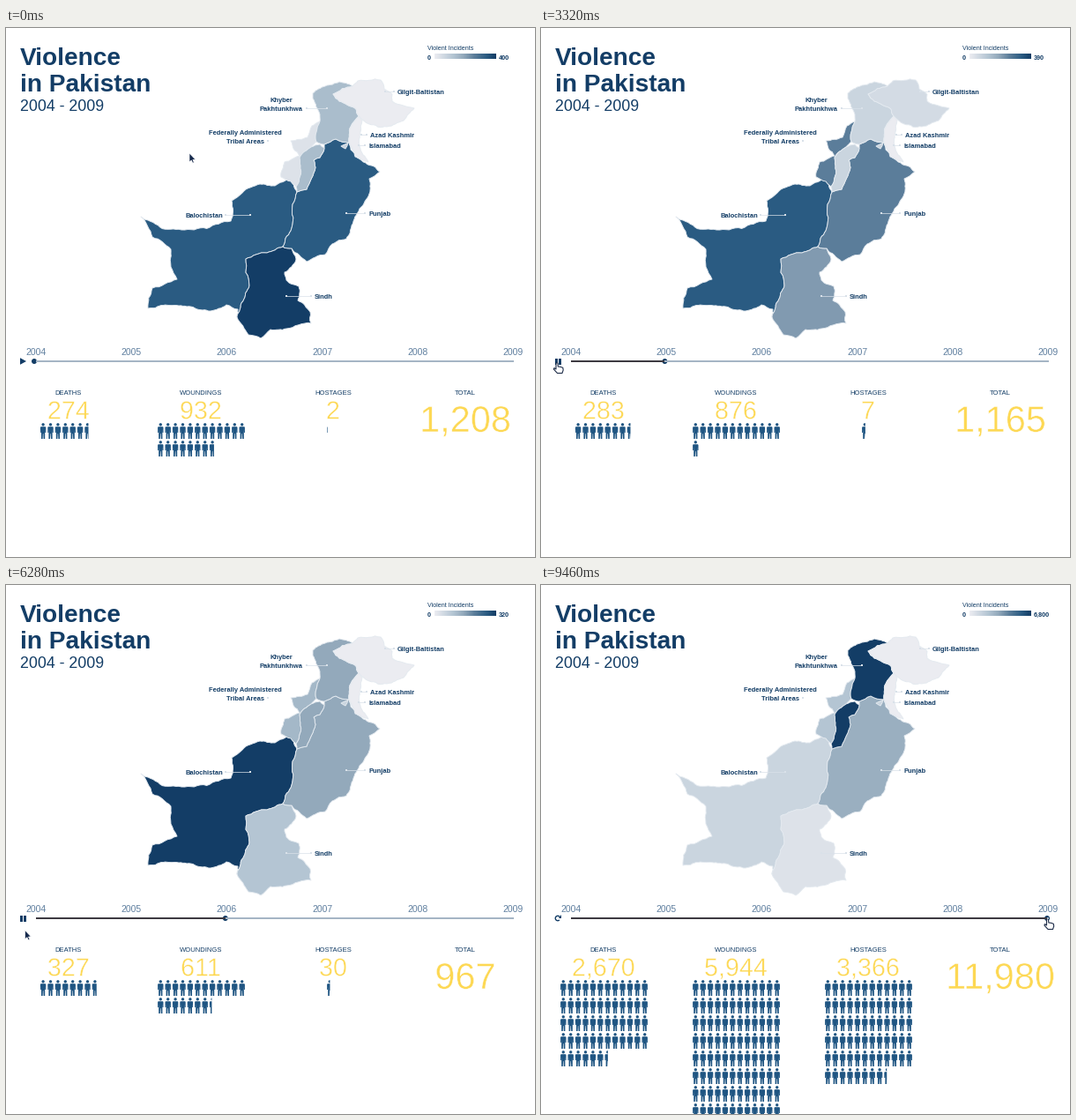
Write a matplotlib script that moves like this. It is 600x600 px and loops after 9.48 s.

```python
import math
import random

import matplotlib.pyplot as plt
import numpy as np
from matplotlib.animation import FuncAnimation
from matplotlib.colors import LinearSegmentedColormap
from matplotlib.patches import Circle, PathPatch, Polygon
from matplotlib.patheffects import Stroke
from matplotlib.path import Path

STEP, LOOP = 20, 9480
NAVY, YELLOW, ICON = "#133d66", "#fdd853", "#1f5582"

plt.rcParams["font.family"] = "Liberation Sans"
fig = plt.figure(figsize=(6, 6), dpi=100, facecolor="white")
ax = fig.add_axes([0, 0, 1, 1])
ax.axis("off")


def pt(px):
    return px * 0.72


def label(x, yc, s, px, color=NAVY, bold=False, ha="left", **kw):
    """Text whose capitals are centred on yc."""
    return ax.text(x, yc + 0.36 * px, s, size=pt(px), color=color, ha=ha,
                   va="baseline", weight="bold" if bold else "normal", **kw)


def shape(points, fc=NAVY, **kw):
    return ax.add_patch(Polygon(points, **{"fc": fc, "lw": 0, **kw}))


def ease(u):
    u = min(max(u, 0), 1)
    return u * u * (3 - 2 * u)


def fractal(a, b):
    """Points from a up to b, displaced midway again and again."""
    length = math.dist(a, b)
    if length < 4:
        return [a]
    w = random.Random(f"{a}{b}").uniform(-0.1, 0.1)
    m = ((a[0] + b[0]) / 2 - w * (b[1] - a[1]),
         (a[1] + b[1]) / 2 + w * (b[0] - a[0]))
    return fractal(a, m) + fractal(m, b)


def coast(points):
    """Rough outline; an edge shared by two regions comes out the same."""
    out = []
    for a, b in zip(points, points[1:] + points[:1]):
        out += fractal(a, b) if a < b else [a] + fractal(b, a)[:0:-1]
    return out


# Borders used by two regions
PUNJAB_WEST = [(330, 186), (325, 200), (323, 230), (314, 248)]
SINDH_WEST = [(314, 248), (296, 255), (272, 262), (276, 292), (262, 328)]
TAIL_WEST = [(346, 135), (333, 147), (334, 156), (329, 180)]
TAIL_EAST = [(361, 136), (356, 147), (349, 150), (351, 158), (341, 183), (330, 186)]
KP_SOUTH = [(361, 132), (374, 126), (389, 130)]
KP_WEST = [(356, 106), (352, 118), (352, 129)]
KP_EAST = [(400, 100), (391, 112), (389, 130)]
GILGIT_WEST = [(393, 66), (371, 75), (378, 83), (397, 92), (400, 100)]

SHAPES = {
    "baloch": [
        (153, 214), (199, 229), (255, 219), (256, 196), (268, 187), (288, 177),
        (305, 179), (321, 170)] + PUNJAB_WEST + SINDH_WEST[1:] + [
        (263, 319), (250, 314), (232, 321), (196, 315), (161, 318), (166, 295),
        (194, 285), (187, 271), (187, 251), (166, 237)],
    "sindh": SINDH_WEST[::-1] + [
        (324, 250), (329, 262), (316, 277), (318, 286), (332, 293), (331, 309),
        (345, 322), (346, 335), (318, 341), (300, 342), (289, 352), (275, 348)],
    "punjab": PUNJAB_WEST[::-1] + TAIL_EAST[-2::-1] + KP_SOUTH + [
        (391, 138), (408, 153), (424, 163), (412, 171), (412, 188), (401, 205),
        (392, 224), (386, 239), (370, 245), (362, 257), (341, 265), (324, 250)],
    "fata": [(323, 128), (342, 124), (347, 111)] + KP_WEST + TAIL_WEST + [
        (323, 174), (312, 169), (316, 152), (333, 145)],
    "kp": [(348, 74), (362, 66), (378, 61)] + GILGIT_WEST + KP_EAST[1:]
        + KP_SOUTH[-2::-1] + KP_WEST[::-1] + [(356, 98), (348, 80)],
    "tail": TAIL_WEST[::-1] + [(356, 132)] + TAIL_EAST,
    "gilgit": GILGIT_WEST[::-1] + [
        (399, 60), (425, 59), (429, 69), (438, 75), (438, 83), (463, 91),
        (451, 105), (432, 112), (412, 109)],
    "kashmir": KP_EAST[::-1] + [
        (404, 105), (402, 118), (401, 134), (411, 152), (396, 146)],
    "capital": [(380, 134), (388, 130), (385, 137)],
}

# State of each stop: counts, legend top, year offset, icons per column
STOPS = np.array([
    [274, 932, 2, 1208, 400, 0, 6.5, 19.6, 0.07],
    [283, 876, 7, 1165, 390, 1, 7.45, 12.85, 0.45],
    [327, 611, 30, 967, 320, 2, 7.6, 19.3, 0.4],
    [1047, 2142, 210, 3399, 1330, 3, 27.7, 53.8, 6.75],
    [1606, 3308, 904, 5818, 2750, 5, 54.4, 96, 68.35],
    [2670, 5944, 3366, 11980, 6800, 5, 54.4, 96, 68.35],
])
CHANGES = [(2950, 3300), (4850, 5080), (6500, 6800), (8000, 8460), (8460, 9000)]

# Share of the legend top at each stop
LEVELS = {
    "baloch": [0.85, 0.85, 1, 0.47, 0.18, 0.18],
    "sindh": [1, 0.53, 0.3, 0.38, 0.08, 0.08],
    "punjab": [0.85, 0.65, 0.47, 0.3, 0.43, 0.43],
    "fata": [0.08, 0.65, 0.38, 0.47, 0.3, 0.3],
    "kp": [0.35, 0.18, 0.47, 1, 1, 1],
    "gilgit": [0, 0.13, 0, 0, 0, 0],
    "kashmir": [0] * 6,
    "capital": [0.18] * 6,
}
LEVELS["tail"] = LEVELS["kp"]
RAMP = LinearSegmentedColormap.from_list("ramp", [
    (0, "#ebecf1"), (0.3, "#b4c5d3"), (0.47, "#93a9bb"), (0.65, "#5b7d9a"),
    (0.85, "#2a5b82"), (1, NAVY)])

regions = {name: shape(coast(points), ec="#e4eaf0", lw=pt(0.9), joinstyle="round")
           for name, points in SHAPES.items()}
punjab_area = Path(SHAPES["punjab"])

# Headings and legend
label(16, 32, "Violence", 28, bold=True)
label(16, 62, "in Pakistan", 28, bold=True)
label(16, 88, "2004 - 2009", 17.8)
label(478, 22, "Violent Incidents", 7.2)
label(478, 33, "0", 7.3, bold=True)
legend_max = label(558.5, 33, "", 7.3, bold=True)
ax.imshow(np.linspace(0, 1, 128)[None], extent=(486, 556, 35.5, 30),
          cmap=RAMP, aspect="auto")
ax.set(xlim=(0, 600), ylim=(600, 0))

# Map labels and leaders
for x, y, s, ha in [
        (444, 72, "Gilgit-Baltistan", "left"), (413, 121, "Azad Kashmir", "left"),
        (412, 133, "Islamabad", "left"), (411, 210, "Punjab", "left"),
        (350, 304, "Sindh", "left"), (203, 212, "Balochistan", "left"),
        (312.5, 81, "Khyber", "center"), (312.5, 91, "Pakhtunkhwa", "center"),
        (271.5, 118, "Federally Administered", "center"),
        (271.5, 128, "Tribal Areas", "center")]:
    label(x, y, s, 7.45, bold=True, ha=ha)
for x0, x1, y in [(249, 277, 212), (407, 386, 210), (346, 318, 304),
                  (341, 364, 91), (440, 430, 72), (409, 403, 121),
                  (407, 400, 133), (297, 297, 128)]:
    ax.plot([x0, x1], [y, y], "s-", color="#d9e1e9", lw=pt(0.7), ms=pt(2), mew=0)

# Timeline
for k in range(6):
    label(33.7 + 108.3 * k, 367, str(2004 + k), 10.4, "#5f7f9f", ha="center")
ax.plot([34, 576], [378, 378], color="#a5b5c5", lw=pt(2), solid_capstyle="butt")
done, = ax.plot([], [], color="#3d3a42", lw=pt(2), solid_capstyle="butt")
knob = ax.add_patch(Circle((32, 378), 3, fc=NAVY, lw=0))

play = [shape([(16, 374.2), (23, 378), (16, 381.8)])]
pause = [shape([(x, 374.5), (x + 2.6, 374.5), (x + 2.6, 381.5), (x, 381.5)])
         for x in (16, 20)]
turn = np.radians(np.linspace(60, 315, 30))
replay = ax.plot(19 + 2.7 * np.cos(turn), 378 + 2.7 * np.sin(turn),
                 color=NAVY, lw=pt(1.4))
replay.append(shape([(19.5, 377.6), (22.8, 377.6), (22.8, 374.4)]))

# Counters
for k, s in enumerate(["DEATHS", "WOUNDINGS", "HOSTAGES", "TOTAL"]):
    label(71 + 150 * k, 413, s, 7.6, ha="center")
thin = [Stroke(linewidth=pt(0.5), foreground="white")]
counters = [label(71 + 150 * k, y, "", px, YELLOW, ha="center", path_effects=thin)
            for k, (y, px) in enumerate([(433, 28.7)] * 3 + [(443, 41.5)])]

# Pictograms
ROW, PITCH = 12, 8.4
angle = np.linspace(0, 2 * np.pi, 13)
HEAD = np.column_stack([3.2 + 1.7 * np.cos(angle), 1.8 + 1.7 * np.sin(angle)])
HALF = np.array([(0, 4.2), (2.6, 4.2), (3.2, 5), (3.2, 11), (2.3, 11), (2.1, 7),
                 (2.1, 18), (0.5, 18), (0.2, 12)])
BODY = np.vstack([HALF, HALF[::-1] * (-1, 1)]) + (3.2, 0)


def crowd(center, n):
    """n people in centred rows; the last one is cut to its fraction."""
    left = center - min(ROW, 2 * math.ceil(n / 2)) * PITCH / 2
    out = []
    for k in range(math.ceil(n)):
        row, col = divmod(k, ROW)
        for part in (HEAD, BODY):
            p = np.minimum(part, (max((n - k) * PITCH, 0.5), 20))
            p = p + (left + col * PITCH, 448 + 20 * row)
            out.append(Path(np.vstack([p, p[:1]]), closed=True))
    return out


crowds = [Path.make_compound_path(
    *[p for k in range(3) for p in crowd(72.5 + 150 * k, stop[6 + k])])
    for stop in STOPS]
people = ax.add_patch(PathPatch(crowds[0], fc=ICON, lw=0))

# Tooltip
tip = [
    shape([(331, 151), (408, 151), (408, 190), (374, 190), (369.5, 195),
           (365, 190), (331, 190)], (1, 1, 0.975, 0.9), ec="#dcdcd4", lw=pt(0.8)),
    label(369, 168, "324", 13, bold=True, ha="center"),
    label(369, 179, "Violent incidents", 7.6, "#4a4a50", bold=True, ha="center"),
]

# Pointer
ARROW = np.array([(0, 0), (0, 10), (2.3, 8), (3.8, 11.2), (5.3, 10.5),
                  (3.9, 7.4), (6.8, 7.2)])
HAND = np.array([(-1, 0.3), (0, -0.5), (1, 0.3), (1.3, 4), (4, 4.3), (6.8, 5.3),
                 (7.2, 8), (6, 11.5), (0.5, 11.5), (-3.6, 7), (-3, 5.6), (-1, 7)])
START, REGION, BUTTON, ASIDE = (208, 142), (349.5, 229), (18, 380), (22, 393)
GRAB, DROP = (357, 379), (574.5, 379)
MOVES = [(500, 1400, START, REGION), (2000, 2600, REGION, BUTTON),
         (3900, 4300, BUTTON, ASIDE), (6200, 6600, ASIDE, BUTTON),
         (7400, 7900, BUTTON, GRAB), (8000, 8460, GRAB, DROP)]
pointer = shape(ARROW, joinstyle="round")


def pointer_at(t):
    pos = np.array(START, float)
    for t0, t1, a, b in MOVES:
        pos += np.subtract(b, a) * ease((t - t0) / (t1 - t0))
    return pos


def show(artists, on):
    for artist in artists:
        artist.set_visible(on)


def draw(i):
    t = i * STEP
    pos = pointer_at(t)
    hover = t < 2700 and bool(punjab_area.contains_point(pos))

    # s runs from 0 to 5 through the stops
    s = sum(ease((t - t0) / (t1 - t0)) for t0, t1 in CHANGES)
    k = min(int(s), 4)
    now = STOPS[k] + (STOPS[k + 1] - STOPS[k]) * (s - k)

    for name, patch in regions.items():
        patch.set_facecolor(RAMP(np.interp(s, range(6), LEVELS[name])))
    if hover:
        regions["punjab"].set_facecolor(YELLOW)
    show(tip, hover)

    for text, value in zip(counters, now):
        text.set_text(f"{round(value):,}")
    legend_max.set_text(f"{round(now[4], -1):,.0f}")
    people.set_path(crowds[sum(t >= t0 for t0, _ in CHANGES)])

    kx = 32 + 108.4 * now[5]
    knob.center = kx, 378
    done.set_data([34, max(kx, 34)], [378, 378])
    show(play, t < 2700)
    show(pause, 2700 <= t < 8440)
    show(replay, t >= 8440)

    on_button = math.dist(pos, BUTTON) < 7
    hand = hover or on_button or t > 7850
    pointer.set_xy((HAND if hand else ARROW) + pos)
    pointer.set_facecolor("white" if hand else "#16294c")
    pointer.set_edgecolor("#1d2c48" if hand else "white")
    pointer.set_linewidth(pt(1.1 if hand else 0.6))


anim = FuncAnimation(fig, draw, frames=LOOP // STEP, interval=STEP,
                     repeat=True, repeat_delay=0, blit=False)
plt.show()
```
